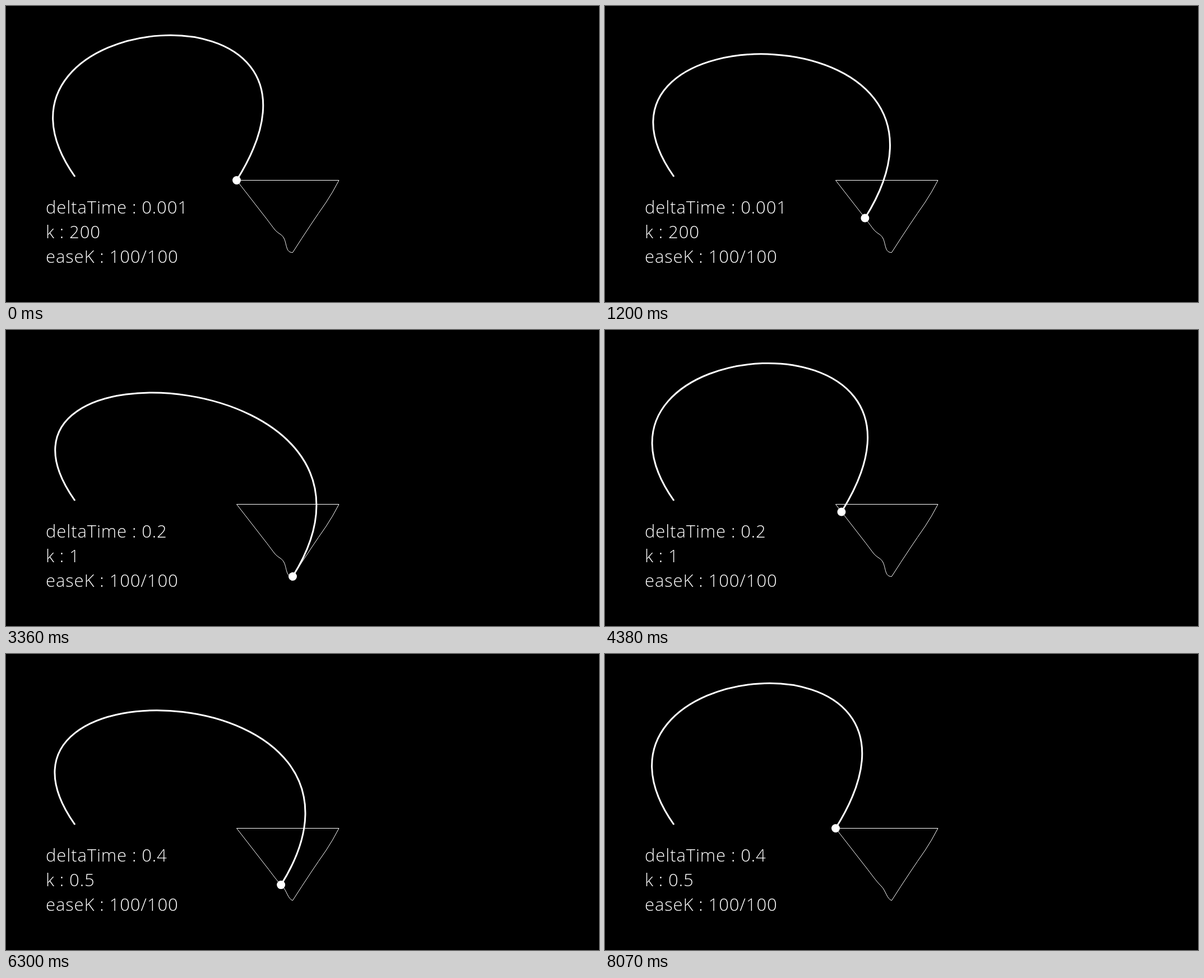
Write an HTML page that moves like this. It is 1058x529 px and loops after 8.1 s.

```html
<!DOCTYPE html>
<html lang="en">
<head>
<meta charset="utf-8">
<title>Eased pointer</title>
<style>
  html, body { margin: 0; height: 100%; overflow: hidden; background: #000; }
  svg { display: block; width: 100%; height: 100%; }
  path { fill: none; stroke: #fff; }
  text { fill: #fff; font: 300 31px "Open Sans", "Noto Sans", sans-serif; letter-spacing: .9px; white-space: pre; }
</style>
</head>
<body>
<svg viewBox="0 0 1058 529">
  <path id="across" d="M411.5 311.5H594"/>
  <path id="down" d="M594 311.5Q583 333 571 351Q545 388 511.5 440.5"/>
  <path id="back"/>
  <path id="curve" stroke-width="3"/>
  <circle id="ball" r="7.5" fill="#fff"/>
  <text id="delta" x="71" y="371"></text>
  <text id="gain" x="71" y="415"></text>
  <text x="71" y="459">easeK : 100/100</text>
</svg>
<script>
const STEP = 30, SECTION = 2700;
const EASE = 0.2;                       // k * deltaTime, the same in every section
const DELTA_TIMES = [0.001, 0.2, 0.4];
const TURN = 430, LOW = 660, BRAKE = 1680;
const SPEED = 0.1425, BRAKE_DISTANCE = 17;

const FINE = "M511.5 440.5C500 441 501 428 497 417.5S486 408 479 399S469 385.5 460 374L411.5 311.5";
const COARSE = "M511.5 440.5C503 438 501 423 493 415S480 400 469 385.5L411.5 311.5";

const [across, down, back, curve, ball, delta, gain] =
  ["across", "down", "back", "curve", "ball", "delta", "gain"].map(id => document.getElementById(id));

const smooth = u => u * u * (3 - 2 * u);
const decay = ms => (1 - EASE) ** (ms / STEP);
const along = (path, u) => path.getPointAtLength(u * path.getTotalLength());

// Distance still to go on the way back: ease into a steady speed, then brake.
function remaining(t, length) {
  if (t > BRAKE) return BRAKE_DISTANCE * decay(t - BRAKE);
  const steady = time => BRAKE_DISTANCE + SPEED * (BRAKE - time);
  return steady(t) + (length - steady(LOW)) * decay(t - LOW);
}

function position(t) {
  if (t < TURN) return along(across, smooth(t / TURN));
  if (t < LOW) return along(down, smooth((t - TURN) / (LOW - TURN)));
  const length = back.getTotalLength();
  return back.getPointAtLength(length - remaining(t, length));
}

function draw(now) {
  const time = Math.floor(now / STEP) * STEP % (SECTION * DELTA_TIMES.length);
  const dt = DELTA_TIMES[Math.floor(time / SECTION)];
  back.setAttribute("d", dt > 0.2 ? COARSE : FINE);
  const { x, y } = position(time % SECTION);
  curve.setAttribute("d", `M123 305C-91 2 ${x + 236.5} ${y - 378} ${x} ${y}`);
  ball.setAttribute("cx", x);
  ball.setAttribute("cy", y);
  delta.textContent = `deltaTime : ${dt}`;
  gain.textContent = `k : ${EASE / dt}`;
}

const start = performance.now();
function tick() {
  draw(performance.now() - start);
  requestAnimationFrame(tick);
}
tick();
</script>
</body>
</html>
```
